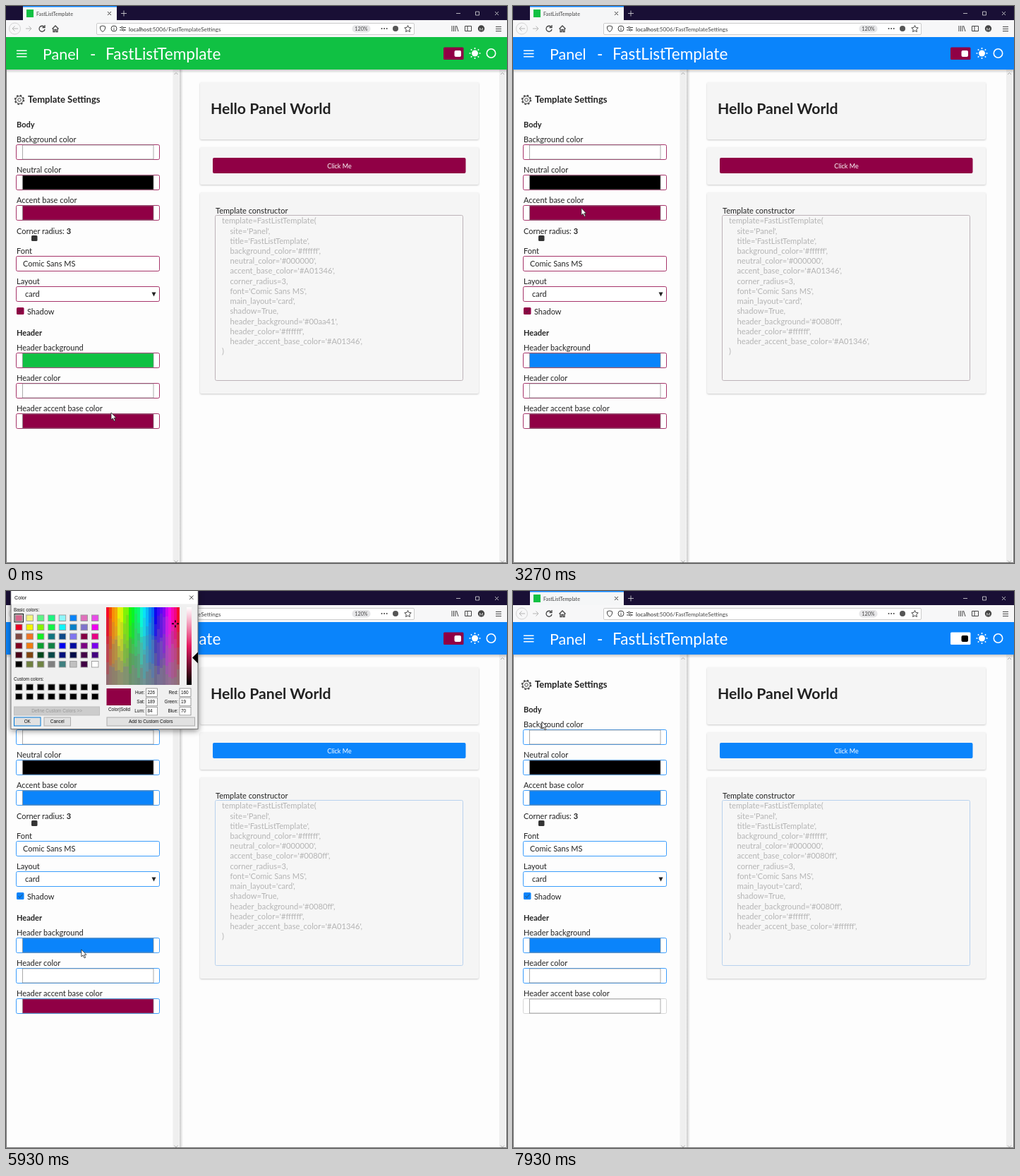
These frames come from a looping animation (710x789 px, 8000 ms). An HTML page:

```html
<!DOCTYPE html>
<html lang="en">
<head>
<meta charset="utf-8">
<title>Template settings</title>
<style>
html, body { margin: 0; width: 100%; height: 100%; overflow: hidden; background: #fdfdfd; }
svg { display: block; width: 710px; height: 789px; }
text { white-space: pre; }
.page { font: 11px Lato, sans-serif; fill: #222; }
.bold { font-weight: 700; }
.dialog { font: 6.4px "Liberation Sans", Arial, sans-serif; fill: #111; }
.chrome { font: 7.2px Lato, sans-serif; fill: #444; }
.card { fill: #f5f5f5; filter: drop-shadow(0 1px 1.2px #0003); }
</style>
</head>
<body>
<svg id="stage" viewBox="0 0 710 789"></svg>
<script>
const LOOP = 8000;
const MAROON = '#900045', BLUE = '#0a84fb', GREEN = '#10c143';

const attrs = o => Object.entries(o).map(([k, v]) => `${k}="${v}"`).join(' ');
const rect = (x, y, width, height, fill, more = {}) =>
  `<rect ${attrs({ x, y, width, height, fill, ...more })}/>`;
const text = (x, y, s, more = {}) => `<text ${attrs({ x, y, ...more })}>${s}</text>`;
const LINE = { fill: 'none', stroke: '#444', 'stroke-width': 1 };
const path = (d, more = {}) => `<path ${attrs({ d, ...LINE, ...more })}/>`;
const circle = (cx, cy, r, more = {}) => `<circle ${attrs({ cx, cy, r, ...LINE, ...more })}/>`;
const solid = fill => ({ fill, stroke: 'none' });
const times = (n, fn) => Array.from({ length: n }, (_, i) => fn(i)).join('');

function browser() {
  const light = { stroke: '#ddd', 'stroke-width': .8 };
  return `<g class="chrome">` +
    rect(0, 0, 710, 20, '#190f35') +
    rect(24, 0, 133, 20, '#f5f6f7') + rect(24, 0, 133, 1.5, '#0a84ff') +
    rect(29, 5, 10, 11, GREEN) +
    text(43, 13.5, 'FastListTemplate') +
    path('M144 8l5 5m0-5l-5 5') + path('M163 10.5h8m-4-4v8', light) +
    path('M638 10.5h6M665.5 8h5v5h-5zM693 8l5 5m0-5l-5 5', light) +
    rect(0, 20, 710, 24, '#f7f7f8') +
    circle(12.5, 32, 8, { stroke: '#d4d4d4' }) +
    path('M17 32H9m3.5-3.5L9 32l3.5 3.5M28 32h8m-3.5-3.5L36 32l-3.5 3.5', { stroke: '#b4b4b4' }) +
    path('M54 29.5a4 4 0 1 0 1 3.5M55 27v3.5h-3.5', { 'stroke-width': 1.3 }) +
    path('M65.5 32.5l4.5-4.5 4.5 4.5M67 32v4.5h2v-3h2v3h2V32', { 'stroke-width': 1.3 }) +
    rect(128.5, 24.5, 450, 16, '#fff', { stroke: '#ccc', rx: 1.5 }) +
    path('M133.5 29l3.5-1 3.5 1v3q-.5 3-3.5 4.5-3-1.5-3.5-4.5z') +
    circle(153, 32, 4) + path('M153 31.5v3m0-5v1') +
    path('M161 30.5h2m3 0h4M161 34h4m3 0h2') +
    circle(164.5, 30.5, 1.3) + circle(166.5, 34, 1.3) +
    text(174, 35.5, '<tspan fill="#222">localhost</tspan>:5006/FastTemplateSettings', { 'font-size': 8.1 }) +
    rect(490.5, 27, 26, 10.5, '#e6e6e8', { rx: 5 }) +
    text(503.5, 35, '120%', { 'text-anchor': 'middle' }) +
    times(3, i => rect(531.5 + i * 3.6, 31, 2, 2, '#444', { rx: 1 })) +
    circle(552, 32, 4, solid('#555')) +
    path('M569.5 27.5l1.4 3 3.3.4-2.4 2.3.6 3.3-2.9-1.6-2.9 1.6.6-3.3-2.4-2.3 3.3-.4z') +
    path('M632 28v8m2.5-8v8m2.5-8v8m1.5-8l2.5 8M650.5 28.5h9v7h-9zM654 28.5v7') +
    circle(673.5, 32, 4.7, solid('#444')) +
    text(673.5, 34.5, 'M', { 'text-anchor': 'middle', 'font-size': 6, fill: '#fff' }) +
    path('M694 29.5h8m-8 3h8m-8 3h8') + `</g>`;
}

function scrollbar(x, w) {
  return rect(x, 90, w, 699, '#efefef') +
    path(`M${x + w / 2 - 2.5} 97l2.5-2.5 2.5 2.5m-5 688.5l2.5 2.5 2.5-2.5`, { stroke: '#aaa' });
}

const box = (y, stroke = 'var(--accent)') =>
  rect(14.5, y, 203, 21, '#fff', { rx: 2, style: `stroke:${stroke}`, 'stroke-width': .8 });
const colorField = (y, label, fill, stroke) =>
  text(15, y, label) + box(y + 3.5, stroke) +
  rect(23.5, y + 4, 185.5, 20, '', { style: `fill:${fill};stroke:#888;stroke-width:.7` });

function sidebar() {
  return rect(1, 90, 235, 698, '#fdfdfd') + scrollbar(236.5, 9) +
    rect(246, 90, 5, 698, 'url(#edge)') +
    `<g class="page">` +
    circle(19, 133, 6.3, { 'stroke-width': 1.8, 'stroke-dasharray': 2.474 }) +
    circle(19, 133, 5.3) + circle(19, 133, 2.3) +
    text(31, 137, 'Template Settings', { class: 'bold', 'font-size': 13 }) +
    text(15, 172, 'Body', { class: 'bold' }) +
    colorField(193, 'Background color', '#fff') +
    colorField(236, 'Neutral color', '#000') +
    colorField(279, 'Accent base color', 'var(--accentSwatch)', 'var(--accentEdge)') +
    text(15, 322.5, 'Corner radius: <tspan class="bold">3</tspan>') +
    rect(36, 325, 8.5, 8, '#333', { rx: 1.5 }) +
    text(15, 351, 'Font') + box(354.5) + text(24, 369, 'Comic Sans MS') +
    text(15, 394, 'Layout') + box(397.5) + text(27, 412, 'card') +
    path('M206.5 405.5h6l-3 6z', solid('#222')) +
    rect(15, 427, 10.5, 10, '', { rx: 1.5, style: 'fill:var(--accent)' }) +
    path('M17.5 432l2 2.5 4-5', { stroke: '#333', opacity: .6 }) +
    text(30, 437, 'Shadow') +
    text(15, 467, 'Header', { class: 'bold' }) +
    colorField(488, 'Header background', 'var(--headSwatch)') +
    colorField(531, 'Header color', '#fff') +
    colorField(574, 'Header accent base color', 'var(--toggleSwatch)', 'var(--toggleEdge)') + `</g>`;
}

function content() {
  const card = (y, h) => rect(275, y, 395, h, '#f5f5f5', { rx: 2, class: 'card' });
  const code = ['template=FastListTemplate(', "site='Panel',", "title='FastListTemplate',",
    "background_color='#ffffff',", "neutral_color='#000000',", "accent_base_color='#A01346',",
    'corner_radius=3,', "font='Comic Sans MS',", "main_layout='card',", 'shadow=True,',
    "header_background='#00aa41',", "header_color='#ffffff',", "header_accent_base_color='#A01346',", ')'];
  return scrollbar(699, 9) + `<g class="page">` +
    card(108, 81) + card(200, 53) + card(264, 285) +
    text(290, 153, 'Hello Panel World', { class: 'bold', 'font-size': 21.2 }) +
    rect(293, 215, 358.5, 22, '', { rx: 2, style: 'fill:var(--accent)' }) +
    text(472.5, 229.5, 'Click Me', { 'text-anchor': 'middle', 'font-size': 9, fill: '#fff' }) +
    text(297, 293.5, 'Template constructor') +
    rect(296.5, 296.5, 351, 234, '#f6f6f6', { rx: 2, style: 'stroke:var(--areaEdge)' }) +
    code.map((s, i) => text(i % 13 ? 317.5 : 306, 308.3 + i * 14.22, s,
      { id: 'code' + i, fill: '#b4b4b4', 'font-size': 11.2 })).join('') + `</g>`;
}

function header() {
  const rays = times(8, i => {
    const a = i * Math.PI / 4, p = r => `${664.5 + r * Math.cos(a)} ${67 + r * Math.sin(a)}`;
    return `M${p(6)}L${p(8)}`;
  });
  const white = { stroke: '#fff', 'stroke-width': 1.6 };
  return rect(0, 90, 710, 5, 'url(#under)') +
    rect(0, 44, 710, 46, '', { style: 'fill:var(--head)' }) +
    path('M15 63.2h14.5m-14.5 4.3h14.5m-14.5 4.3h14.5', white) +
    `<g class="page" style="fill:#fff;font-size:22.6px">` +
    text(52, 75.5, 'Panel', { 'font-size': 21.5 }) + text(119, 75.5, '-') +
    text(141, 75.5, 'FastListTemplate') + `</g>` +
    rect(620, 58.5, 28.5, 17.5, '', { rx: 1.5, style: 'fill:var(--toggle)' }) +
    rect(635.5, 63, 9.5, 9, '', { rx: 2, style: 'fill:var(--knob)' }) +
    circle(664.5, 67, 4.5, solid('#fff')) + path(rays, white) +
    circle(687.5, 67, 6.2, white);
}

const PALETTE = `d9658d f4f47c 5cf485 1cf580 90f6fa 0a84fb e070bc e84ce8
  e80024 f4f400 84f400 10f444 10f4f8 0a80c8 8074cc f000f0
  804a42 f07424 10f024 107480 0c4888 8074f0 840044 e80084
  800020 f07c10 0ca030 108044 0000f0 000ca0 7c0084 7c00f0
  480018 804410 00481c 084848 00107c 000c48 440048 440080
  000000 708040 708444 808080 408080 c0c0c0 400044 ffffff`.split(/\s+/);
const cell = i => [13.5 + i % 8 * 15.42, 34 + Math.floor(i / 8) * 13.1];

function spectrum() {
  let seed = 7;
  const rnd = () => (seed = seed * 16807 % 2147483647) / 2147483647;
  const cols = 26, bands = 6, w = 104 / cols;
  const streaks = times(cols, c => {
    const hue = Math.round((c + rnd() - .5) * 360 / cols);
    return times(bands, b => {
      const y = b ? (b + (rnd() - .5) * 1.1) * 110 / bands : 0;
      return rect(142 + c * w, 23 + y, w, 110 - y, `hsl(${hue} ${94 - b * 16}% ${48 + rnd() * 3}%)`);
    });
  });
  return `<g shape-rendering="crispEdges">${streaks}</g>`;
}

function dialog() {
  const well = (x, y, fill) => rect(x, y, 9.5, 8.5, fill, { stroke: '#999', 'stroke-width': .9 });
  const button = (x, y, w, label, more = {}) =>
    rect(x, y, w, 12, '#e1e1e1', { stroke: '#adadad', ...more }) +
    text(x + w / 2, y + 8.3, label, { 'text-anchor': 'middle', fill: label[0] === 'D' ? '#999' : '#111' });
  const field = (x, y, label, i) =>
    text(x - 2, y + 8, label + ':', { 'text-anchor': 'end' }) +
    rect(x, y, 16, 11.5, '#fff', { stroke: '#888', 'stroke-width': .8 }) + text(x + 2, y + 8, '', { id: 'num' + i });
  return `<g id="dialog" class="dialog">` +
    rect(7, -1, 265, 196.5, '#f0f0f0', { stroke: '#777', style: 'filter:drop-shadow(0 2px 4px #0007)' }) +
    rect(7.5, 0, 264, 18.5, '#fff') +
    text(12, 12, 'Color', { 'font-size': 7.2 }) + path('M260 6.5l5.5 5.5m0-5.5l-5.5 5.5') +
    text(11, 29, 'Basic colors:') + PALETTE.map((c, i) => well(...cell(i), '#' + c)).join('') +
    rect(0, 0, 12.5, 11.5, 'none', { id: 'ring', stroke: '#111' }) +
    text(11, 127, 'Custom colors:') +
    times(16, i => well(13.5 + i % 8 * 15.42, i < 8 ? 132 : 145.3, '#000')) +
    button(11.5, 164, 121, 'Define Custom Colors &gt;&gt;', { fill: '#ccc', stroke: '#bfbfbf' }) +
    button(11.5, 179, 37.5, 'OK', { id: 'ok', stroke: '#0078d7' }) +
    button(54, 179, 37.5, 'Cancel') + button(143, 179, 124.5, 'Add to Custom Colors') +
    spectrum() + path('M-5 0h3m4 0h3M0-5v3m0 4v3', { id: 'cross', stroke: '#000', 'stroke-width': 1.6 }) +
    rect(256, 23, 7, 110, 'url(#lum)') +
    path('M264 0l8-8v16z', { id: 'arrow', ...solid('#000') }) +
    rect(142.5, 138, 34.5, 24, '', { style: 'fill:var(--pick)' }) + text(145, 170, 'Color|Solid') +
    ['Hue', 'Sat', 'Lum', 'Red', 'Green', 'Blue'].map((s, i) =>
      field(i < 3 ? 198.5 : 246, 138 + i % 3 * 13.2, s, i)).join('') + `</g>`;
}

const stops = list => list.map(([o, c]) => `<stop offset="${o}" style="stop-color:${c}"/>`).join('');
const stage = document.getElementById('stage');
stage.innerHTML = `<defs>
  <linearGradient id="edge">${stops([[0, '#0003'], [1, '#0000']])}</linearGradient>
  <linearGradient id="under" x2="0" y2="1">${stops([[0, '#0003'], [1, '#0000']])}</linearGradient>
  <linearGradient id="lum" x2="0" y2="1">${stops([[0, '#fff'], [.5, 'var(--pure)'], [1, '#000']])}</linearGradient>
  </defs>` + rect(0, 0, 710, 789, '#fdfdfd') + content() + sidebar() + header() + browser() +
  path('M.5 90V788.5H709.5V90', { stroke: '#777' }) + dialog() +
  path('M0 0v10l2.4-2 1.8 4 1.7-.8-1.8-3.8h3z',
    { id: 'cursor', fill: '#fff', stroke: '#222', 'stroke-width': .8 });

const $ = id => document.getElementById(id);

// Each choice: fill, palette cell, then hue, sat, lum, red, green, blue.
const green = { fill: GREEN, ring: 0, nums: [95, 240, 80, 0, 170, 65] };
const blue = { fill: BLUE, ring: 5, nums: [140, 240, 120, 0, 128, 255] };
const maroon = { fill: MAROON, ring: 0, nums: [226, 189, 84, 160, 19, 70] };
const white = { fill: '#fff', ring: 47, nums: [160, 0, 240, 255, 255, 255] };
const SESSIONS = [
  { name: 'head', open: 1130, pick: 2050, close: 2730, from: green, to: blue },
  { name: 'accent', open: 3530, pick: 4220, close: 4870, from: maroon, to: blue },
  { name: 'toggle', open: 5700, pick: 6900, close: 7760, from: maroon, to: white },
];
const MOVES = [[0, 149, 576], [300, 149, 576], [1000, 143, 509], [1300, 143, 509], [1950, 95, 38],
  [2150, 95, 38], [2550, 30, 185], [2730, 30, 185], [3350, 100, 291], [3600, 100, 291], [4080, 94, 38],
  [4300, 94, 38], [4700, 38, 184], [5000, 38, 184], [5550, 110, 586], [5780, 110, 586], [6380, 90, 92],
  [6450, 90, 92], [6800, 126, 103], [7000, 126, 103], [7450, 41, 185], [LOOP, 41, 185]];

function cursorAt(t) {
  const i = MOVES.findIndex(m => m[0] > t);
  const [t0, x0, y0] = MOVES[i - 1], [t1, x1, y1] = MOVES[i];
  const u = (t - t0) / (t1 - t0), e = u * u * (3 - 2 * u);
  return [x0 + (x1 - x0) * e, y0 + (y1 - y0) * e];
}

const setVar = (name, value) => stage.style.setProperty('--' + name, value);
const place = (id, x, y) => $(id).setAttribute('transform', `translate(${x} ${y})`);

function showDialog(choice, [cx, cy]) {
  const { nums: [hue, sat, lum], nums, fill, ring } = choice;
  const [x, y] = cell(ring);
  place('ring', x - 1.5, y - 1.5);
  place('cross', 142.5 + hue / 240 * 103.5, Math.max(25, 133 - sat / 240 * 110));
  place('arrow', 0, 133 - lum / 240 * 110);
  nums.forEach((n, i) => $('num' + i).textContent = n);
  setVar('pick', fill);
  setVar('pure', `hsl(${hue * 1.5} ${sat / 2.4}% 50%)`);
  const hover = cx > 12 && cx < 49 && cy > 179 && cy < 192;
  $('ok').setAttribute('fill', hover ? '#d5eafa' : '#e1e1e1');
}

function render(t) {
  const pos = cursorAt(t);
  place('cursor', ...pos);
  for (const s of SESSIONS) {
    setVar(s.name + 'Swatch', (t < s.pick ? s.from : s.to).fill);
    setVar(s.name, (t < s.close ? s.from : s.to).fill);
  }
  const [head, accent, toggle] = SESSIONS.map(s => t >= s.close);
  setVar('knob', toggle ? '#000' : '#fff');
  setVar('areaEdge', accent ? '#b8d2ee' : '#bdb3b8');
  setVar('accentEdge', accent && t < 5200 ? '#b5cde2' : 'var(--accent)');
  setVar('toggleEdge', toggle ? '#ccc' : 'var(--accent)');
  $('code5').textContent = `accent_base_color='${accent ? '#0080ff' : '#A01346'}',`;
  $('code10').textContent = `header_background='${head ? '#0080ff' : '#00aa41'}',`;
  $('code12').textContent = `header_accent_base_color='${toggle ? '#ffffff' : '#A01346'}',`;

  const active = SESSIONS.find(s => t >= s.open && t < s.close);
  $('dialog').style.display = active ? '' : 'none';
  if (active) showDialog(t < active.pick ? active.from : active.to, pos);
}

const start = performance.now();
function tick() {
  render((performance.now() - start) % LOOP);
  requestAnimationFrame(tick);
}
tick();
</script>
</body>
</html>
```
